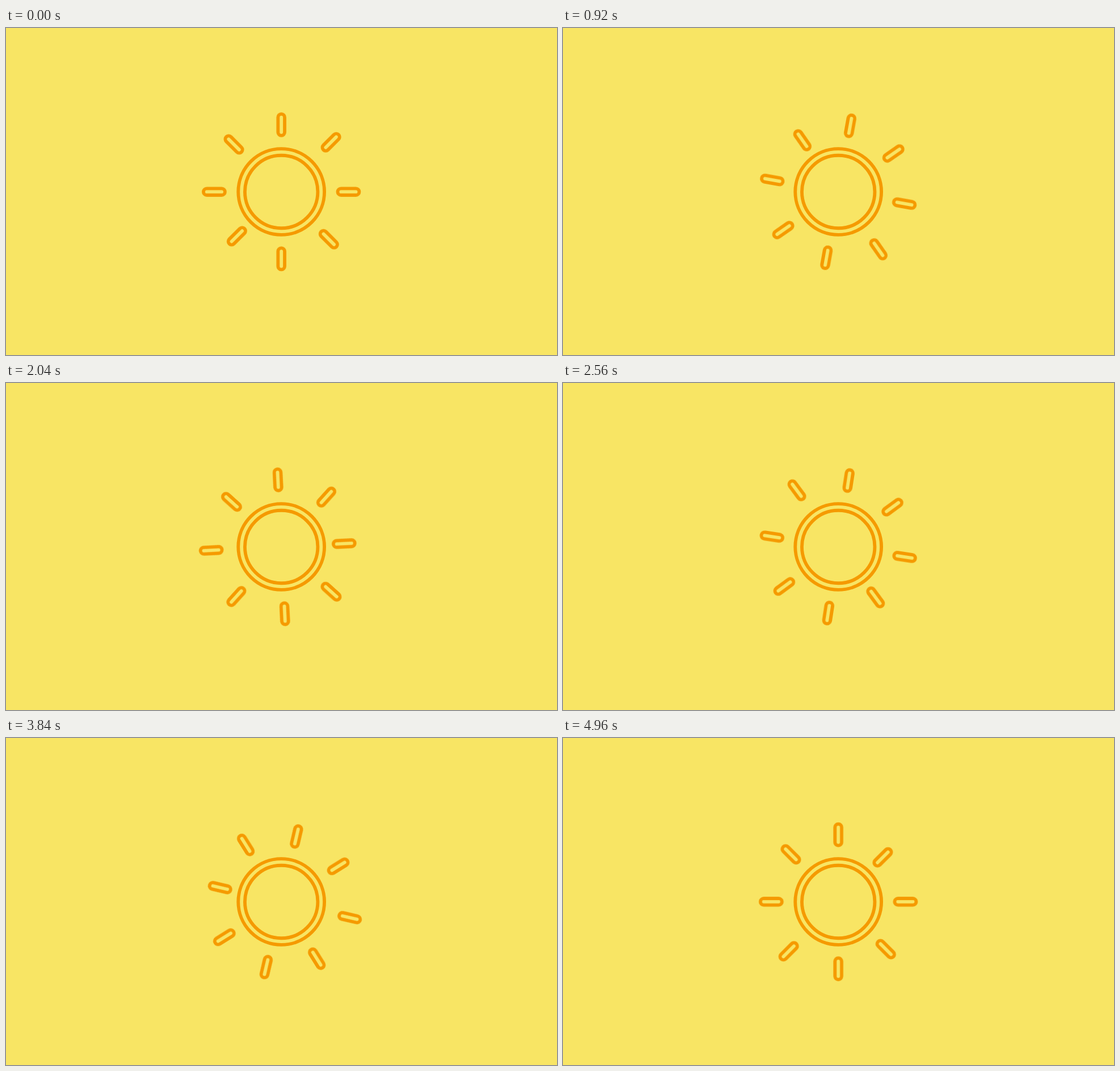
These frames come from a looping animation (971 px wide and 577 px high, 5 s). An HTML page:

```html
<!DOCTYPE html>
<html lang="en">
<head>
<meta charset="utf-8">
<title>Sun</title>
<style>
  html, body { margin: 0; width: 100%; height: 100%; overflow: hidden; background: #f8e564; }
  svg { display: block; width: 971px; height: 577px; }
  .sun { fill: none; stroke: #f59a00; stroke-width: 1; }
  #rays { transform-origin: 0 0; animation: spin 5s steps(125, jump-none) infinite; }
  @keyframes spin {
    from { transform: rotate(0deg); }
    to { transform: rotate(540deg); }
  }
</style>
</head>
<body>
<svg viewBox="0 0 971 577">
  <g class="sun" transform="translate(485.2 289) scale(5.84)">
    <circle r="13"/>
    <circle r="11"/>
    <g id="rays"></g>
  </g>
</svg>
<script>
  const rays = document.getElementById('rays');
  const WIDTH = 2, LENGTH = 6.5, REACH = 20.25;
  // One opposite pair sits off centre along its own axis.
  const offCentre = { 45: 21.18, 225: 18.97 };

  function addRay(angle) {
    const ray = document.createElementNS('http://www.w3.org/2000/svg', 'rect');
    const attrs = {
      x: -WIDTH / 2,
      y: -(offCentre[angle] || REACH) - LENGTH / 2,
      width: WIDTH,
      height: LENGTH,
      rx: WIDTH / 2,
      transform: `rotate(${angle})`
    };
    for (const key in attrs) ray.setAttribute(key, attrs[key]);
    rays.appendChild(ray);
  }

  for (let angle = 0; angle < 360; angle += 45) addRay(angle);
</script>
</body>
</html>
```
